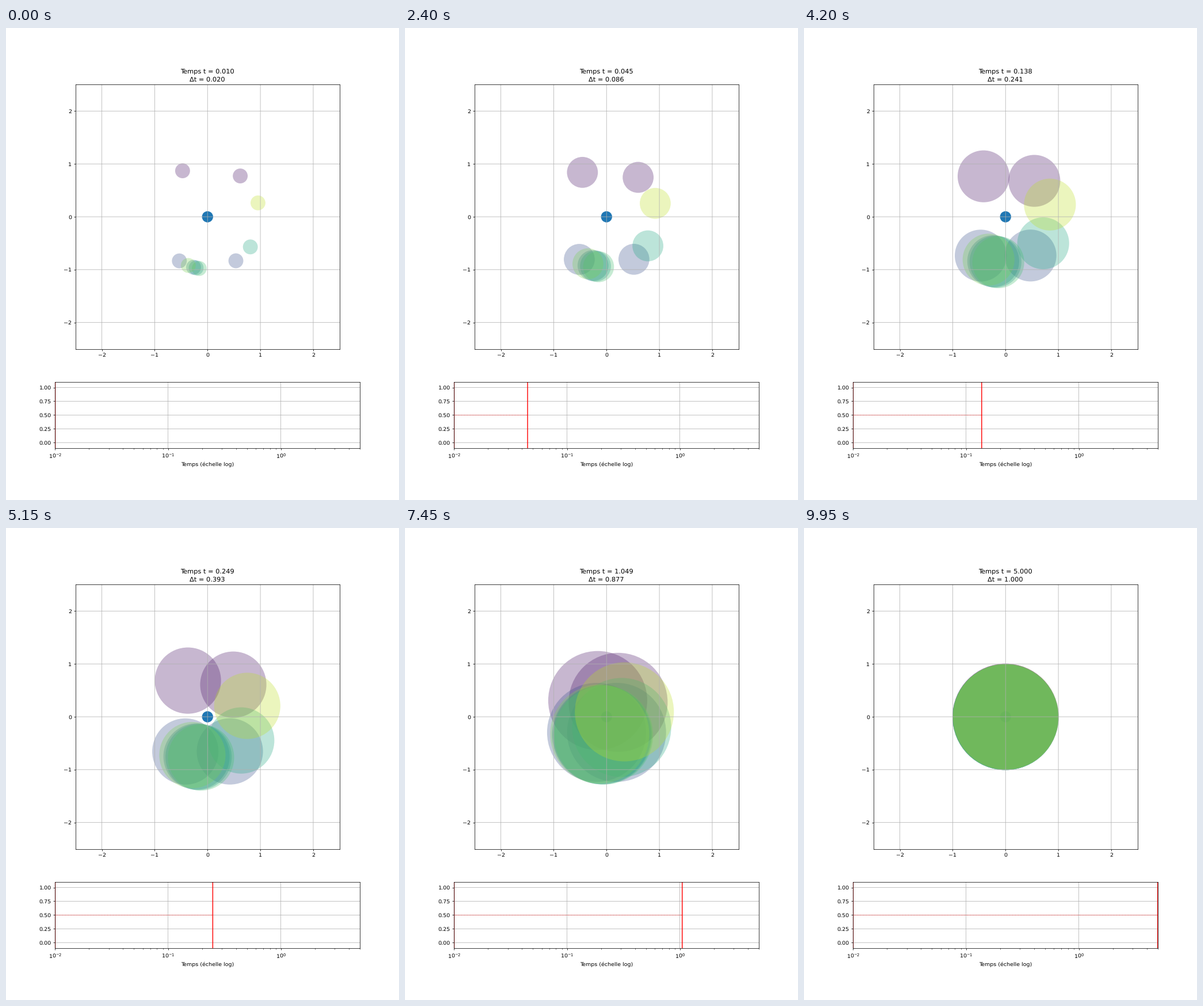
Recreate the animation shown at these times as a matplotlib script. Size 683x820 px, loop 10 s.

```python
import numpy as np
import matplotlib.pyplot as plt
from matplotlib.animation import FuncAnimation
from matplotlib.patches import Circle

DPI = 68.3
FRAMES, INTERVAL = 200, 50
T_MIN, T_MAX = 0.01, 5

plt.rcParams["text.hinting"] = "none"

times = np.geomspace(T_MIN, T_MAX, FRAMES)

# Start positions on the unit circle, in degrees, and their colormap levels
angles = np.radians([118.5, 51.3, 237.4, 302.8, 254.5,
                     257.4, 324.9, 260.9, 248.4, 15.4])
starts = np.column_stack([np.cos(angles), np.sin(angles)])
levels = [0.05, 0.05, 0.25, 0.25, 0.4, 0.5, 0.6, 0.7, 0.8, 0.9]

fig, (ax, ax_time) = plt.subplots(
    2, 1, figsize=(683.01 / DPI, 820.01 / DPI), dpi=DPI,
    gridspec_kw={"height_ratios": [4, 1]})

ax.set_xlim(-2.5, 2.5)
ax.set_ylim(-2.5, 2.5)
ax.set_aspect("equal", anchor=(0.503, 0.5))
ax.grid(True, snap=False)
title = ax.set_title("\n", linespacing=1.4)

ax.add_patch(Circle((0, 0), 0.1, color="C0"))
clouds = [
    ax.add_patch(Circle(start, 0.1, facecolor=plt.cm.viridis(level),
                        edgecolor="none", alpha=0.3))
    for start, level in zip(starts, levels)
]

ax_time.set_xscale("log")
ax_time.set_xlim(T_MIN, T_MAX)
ax_time.set_ylim(-0.1, 1.1)
ax_time.set_yticks(np.linspace(0, 1, 5))
ax_time.set_xlabel("Temps (échelle log)")
ax_time.grid(True, snap=False)
ax_time.axvline(T_MIN, color="red", lw=1.5, snap=False)
cursor = ax_time.axvline(T_MIN, color="red", lw=1.5, snap=False)
trail, = ax_time.plot([], [], color="red", ls=":", lw=1)


def update(frame):
    t = times[frame]
    variance = 1 - np.exp(-2 * t)
    for cloud, start in zip(clouds, starts):
        cloud.center = start * np.exp(-t)
        cloud.radius = np.sqrt(variance)
    title.set_text(f"Temps t = {t:.3f}\nΔt = {variance:.3f}")
    cursor.set_xdata([t, t])
    trail.set_data([T_MIN, t], [0.5, 0.5])
    return [*clouds, title, cursor, trail]


anim = FuncAnimation(fig, update, frames=FRAMES, interval=INTERVAL,
                     repeat=True, repeat_delay=0, blit=False)
plt.show()
```
